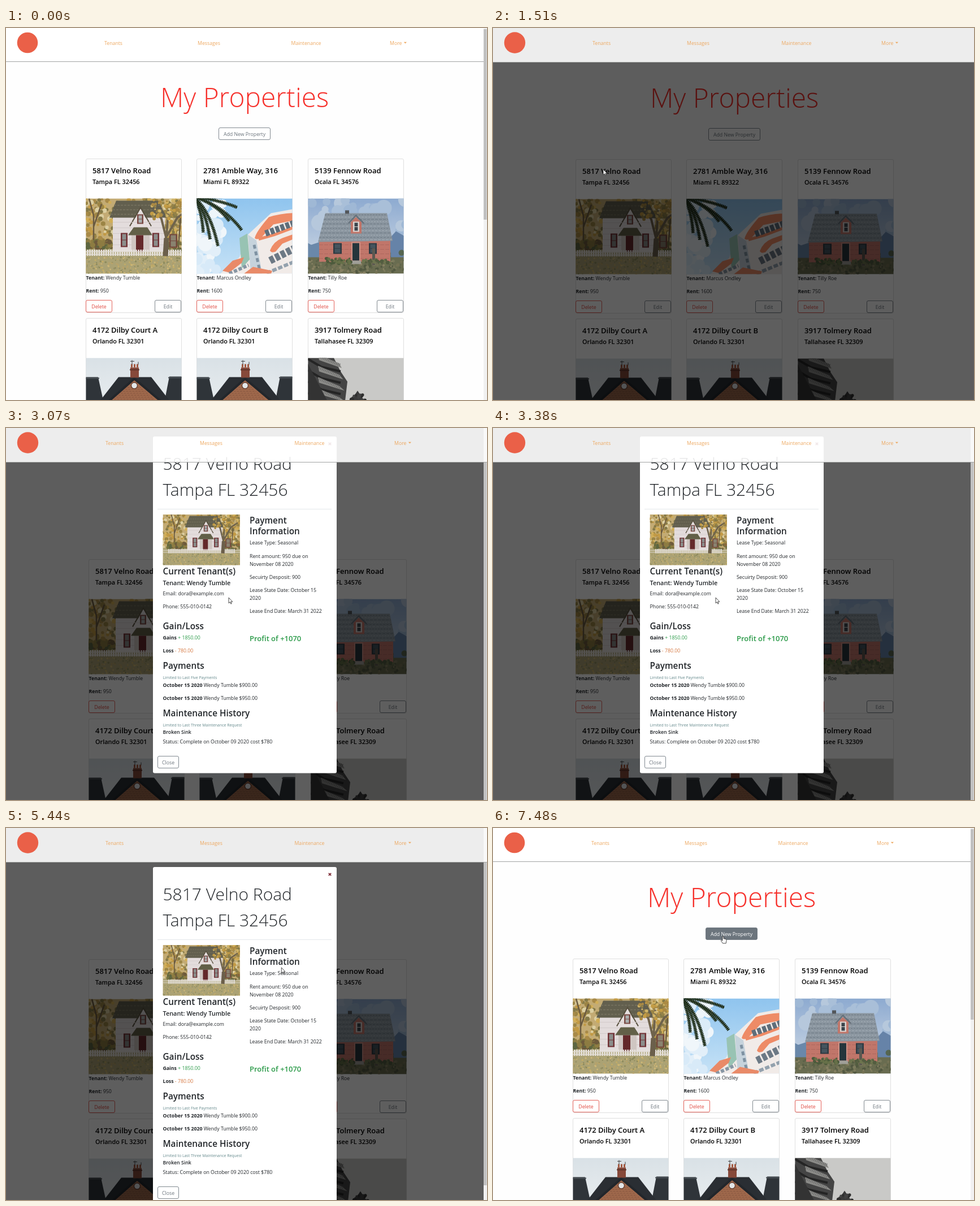
These frames come from a looping animation (851x658 px, 8 s). An HTML page:

```html
<!DOCTYPE html>
<html lang="en">
<head>
<meta charset="utf-8">
<title>My Properties</title>
<style>
html, body { margin: 0; width: 100%; height: 100%; overflow: hidden; background: #fefefe; }
svg { display: block; }
text { font-family: "Open Sans", "Noto Sans", sans-serif; fill: #212529; white-space: pre; }
.light { font-weight: 300; }
.semi { font-weight: 600; }
.bold { font-weight: 700; }
.mid { text-anchor: middle; }
#navItems text, #navItems path { fill: #eda860; }
#click { mix-blend-mode: multiply; }
</style>
</head>
<body>
<svg id="stage" width="851" height="658" viewBox="0 0 851 658"></svg>
<script>
const LOOP = 8000, BODY = 8.75, GREY = '#6c757d', RED = '#e0483f', ORANGE = '#f0a848';

// Drawing helpers
let seed = 7;
const rnd = () => (seed = seed * 16807 % 2147483647) / 2147483647;
const rect = (x, y, w, h, fill, more = '') =>
  `<rect x="${x}" y="${y}" width="${w}" height="${h}" fill="${fill}" ${more}/>`;
const shape = (fill, d) => `<path fill="${fill}" d="M${d}z"/>`;
const line = (d, stroke, width, dash = '') =>
  `<path d="M${d}" fill="none" stroke="${stroke}" stroke-width="${width}" stroke-dasharray="${dash}"/>`;
const dot = (x, y, r, fill) => `<circle cx="${x}" cy="${y}" r="${r}" fill="${fill}"/>`;
const text = (x, y, s, size = BODY, cls = '', fill = '') =>
  `<text x="${x}" y="${y}" font-size="${size}" class="${cls}" ${fill && `style="fill:${fill}"`}>${s}</text>`;
const bold = s => `<tspan class="bold">${s}</tspan>`;
const tint = (s, fill) => `<tspan style="fill:${fill}">${s}</tspan>`;
const gradient = (id, a, b) => `<linearGradient id="${id}" x2="0" y2="1">
  <stop stop-color="${a}"/><stop offset="1" stop-color="${b}"/></linearGradient>`;
const leaves = (n, x, y, w, h, r, colors) => Array.from({ length: n }, () =>
  dot((x + rnd() * w).toFixed(1), (y + rnd() * h).toFixed(1), (r * (.5 + rnd() * .7)).toFixed(1),
    colors[Math.floor(rnd() * colors.length)])).join('');
const pane = (x, y, w, h, frame, glass) =>
  rect(x, y, w, h, frame) + rect(x + 2.5, y + 2, w - 5, h - 4, glass) +
  line(`${x},${y + h / 2}h${w}`, frame, 1);
const button = (x, y, w, label, color) =>
  rect(x, y, w, 21, 'none', `rx="2.5" stroke="${color}" stroke-opacity=".85"`) +
  text(x + w / 2, y + 14.2, label, BODY, 'mid', color);

// Pictures, each 202 x 133
const pictures = {
  cottage: () => rect(0, 0, 202, 133, '#c3ab74') +
    leaves(420, 0, 0, 202, 88, 4, ['#c29a45', '#d1ae58', '#a88a48', '#857a48', '#dccfa2', '#9c8545']) +
    line('30,88V30L22,0M30,50L44,10M180,88L184,30', '#6a5a40', 2.5) +
    rect(0, 88, 202, 45, '#aba274') +
    leaves(60, 12, 74, 50, 16, 4, ['#5d6640', '#77743f', '#6d5a3c', '#8d7c42']) +
    leaves(30, 158, 78, 44, 14, 4, ['#6b6a40', '#8a6a3c', '#7d7546']) +
    rect(64, 32, 92, 62, '#e3dcdc') + shape('#625f4e', '70,4H144L160,34L58,34') +
    line('66,12H147M64,20H152M60,28H156', '#787460', 1.4, '4 2') +
    shape('#e6dfdf', '113,17L96,50V60H130V50') + line('94,49L113,16L132,49', '#58513f', 2) +
    line('64,42H156M64,52H156M64,62H156M64,72H156M64,82H156', '#d2caca', 1) +
    pane(107, 28, 11, 17, '#7a4a44', '#a9b0b0') +
    rect(97, 64, 32, 30, '#cfc6c2') + shape('#626048', '91,65L101,51H125L134,65') +
    rect(105, 65, 13, 30, '#64292b') + pane(78, 61, 12, 25, '#713135', '#8b8e8c') +
    pane(134, 61, 12, 25, '#713135', '#8b8e8c') + pane(164, 63, 14, 24, '#74483c', '#8a8370') +
    line('14,96H190', '#e9e4df', 11, '2.6 1.5') + line('0,94H202M0,99H202', '#e0dad3', 1.4) +
    line('157,102L159,70', '#6b5f4b', 9) +
    line('159,72L150,36L138,18M159,68L162,20M160,66L178,34L196,22', '#6f634c', 4) +
    leaves(70, 132, 2, 66, 34, 3, ['#c39c45', '#ab8a44', '#948248', '#d0b468']) +
    leaves(320, 0, 104, 202, 29, 1.5, ['#c4ad66', '#8d8a5c', '#cdb677', '#979165', '#b9a36a']),

  hotel: () => rect(0, 0, 202, 133, 'url(#blue)') +
    leaves(34, 8, 56, 52, 78, 11, ['#f0f6fa', '#e2eff9', '#d8eaf8']) +
    leaves(16, 16, 4, 50, 52, 10, ['#eef5fa', '#dcecf8']) +
    shape('#f1ebe8', '58,133L92,104L107,64L148,26L202,16V133') +
    shape('#c6d3dc', '107,64L122,74L132,133H112') +
    shape('#98c3b3', '92,70L106,62L110,108L96,124') +
    shape('#ee8b66', '119,70Q122,58 144,33Q172,24 202,26V36L152,46L130,70Q122,74 119,70') +
    line('126,72L154,64L202,46', '#ee8b66', 5) +
    line('138,62L190,43', '#5f6e7a', 11, '7 2.5') +
    shape('#ee8b66', '146,92Q152,76 168,70L202,58V66L168,80L156,94Q148,97 146,92') +
    line('146,110L194,86', '#6c7985', 13, '8 3') + line('140,132L194,110', '#93a1ad', 6, '8 3') +
    line('118,82L128,128', '#7f92a2', 5, '7 5') +
    shape('#e98a68', '62,128L80,110L100,104L96,114L74,131') +
    shape('#e98a68', '100,133L116,121L150,128L148,133') +
    line('74,133L108,118', '#8796a4', 6, '6 3') +
    ['96,56', '88,16', '54,84', '28,60', '74,40', '66,-4', '40,72'].map(end => {
      const [x, y] = end.split(',');
      return line(`10,-4Q${x * .6 + 8},${y * .25} ${end}`, '#1d2b1c', 6, '2 1') +
        line(`10,-4Q${x * .6 + 8},${y * .25} ${end}`, '#25351f', 2.5);
    }).join(''),

  cabin: () => rect(0, 0, 202, 133, 'url(#dusk)') +
    leaves(30, 0, 2, 202, 60, 12, ['#a9bfd8', '#b6c8dc', '#9fb8d5']) +
    shape('#6a88aa', '0,70L22,82L40,76V108H0') +
    shape('#6683a8', '148,84L172,58L186,66L202,56V108H148') +
    leaves(24, 0, 94, 202, 10, 5, ['#566650', '#64705a']) +
    rect(0, 104, 202, 29, '#696c50') +
    leaves(200, 0, 107, 202, 26, 2.5, ['#5d6248', '#7b7a5c', '#525841', '#747254', '#868062']) +
    rect(36, 73, 126, 39, '#c1766a') +
    line('36,82H162M36,90H162M36,98H162M36,106H162', '#ae685e', 1.2, '7 2') +
    shape('#8a959f', '47,26H156L166,75L34,77') +
    Array.from({ length: 12 }, (_, i) =>
      line(`${46 - i},${29 + i * 4}H${156 + i * .8}`, i % 2 ? '#a3adb5' : '#6e7a84', 1.2, `${3 + i % 3} 2`)).join('') +
    shape('#c1766a', '92,62V42L101,33L111,42V62') + pane(96, 41, 11, 18, '#dcd5d2', '#3a444c') +
    line('88,44L101,30L115,44', '#66717b', 2.5) + rect(82, 21, 7, 6, '#53565a') +
    rect(93, 77, 16, 34, '#cf9186') + rect(95, 79, 12, 31, '#25353c') +
    pane(61, 79, 15, 19, '#2e3a42', '#45545e') + pane(124, 79, 14, 19, '#2e3a42', '#45545e') +
    rect(92, 110, 18, 6, '#a09f98') + rect(130, 88, 5, 30, '#5c5850') +
    leaves(40, 48, 106, 44, 9, 2.8, ['#4d5a3c', '#667048']) +
    leaves(30, 112, 108, 50, 8, 2.8, ['#535d40', '#6d744e']),

  brick: () => rect(0, 0, 202, 133, 'url(#pale)') +
    shape('#2f3439', '0,34H38L47,75V133H0') + shape('#2f3439', '164,33H202V133H156V74') +
    line('0,36H40M162,35H202', '#4b5157', 2) +
    shape('#2a2e33', '42,75L74,34H132L164,75V133H42') +
    shape('#a0694c', '102,39L57,78V133H149V78') +
    Array.from({ length: 20 }, (_, i) => {
      const y = 45 + i * 3.5, half = Math.min(44, (y - 41) * 1.12);
      return line(`${102 - half},${y}h${half * 2}`, '#84543e', 1, '4 1.5');
    }).join('') +
    line('53,80L102,37L153,80', '#22262b', 4) +
    rect(95, 17, 15, 18, '#86493a') + rect(94, 20, 17, 2, '#5e3329') +
    line('97.5,11V17M102.5,11V17M107.5,11V17', '#a45a42', 3) +
    line('98,12V4M95,6H102M109,12V7', '#3a3a3c', .9) +
    dot(102, 49, 6, '#5b3629') + dot(102, 49, 4.8, '#e3e6e8'),

  flats: () => rect(0, 0, 202, 133, '#c9c9c7') +
    shape('#444', '0,0H62L74,24L86,42L82,76L66,133H0') +
    [0, 20, 40, 60].map(y =>
      shape('#8b8b88', `34,${y - 6}L72,${y + 10}L${76 + y / 8},${y + 18}L36,${y + 4}`) +
      line(`16,${y + 2}L40,${y + 16}L74,${y + 24}`, '#242424', 4) +
      line(`36,${y - 3}L74,${y + 13}`, '#666', 5, '1 2')).join('') +
    shape('#333', '16,10L50,75L44,133H0V0') +
    shape('#3a3a3a', '104,58L92,76L86,133H124L116,76') +
    leaves(70, 88, 64, 30, 50, 3.5, ['#2e2e2e', '#424242', '#262626'])
};
const photo = (name, x, y, w, h) =>
  `<svg x="${x}" y="${y}" width="${w}" height="${h}" viewBox="0 0 202 133"
    preserveAspectRatio="xMidYMid slice"><use href="#${name}"/></svg>`;

// Page content
const cards = [
  ['5817 Velno Road', 'Tampa FL 32456', 'cottage', 'Wendy Tumble', 950],
  ['2781 Amble Way, 316', 'Miami FL 89322', 'hotel', 'Marcus Ondley', 1600],
  ['5139 Fennow Road', 'Ocala FL 34576', 'cabin', 'Tilly Roe', 750],
  ['4172 Dilby Court A', 'Orlando FL 32301', 'brick', '', ''],
  ['4172 Dilby Court B', 'Orlando FL 32301', 'brick', '', ''],
  ['3917 Tolmery Road', 'Tallahasee FL 32309', 'flats', '', '']
];
const card = ([street, city, picture, tenant, rent], i) => `
  <g transform="translate(${141.5 + Math.round(i % 3 * 196.4)} ${231.5 + Math.floor(i / 3) * 282})">
  ${rect(0, 0, 169, 272, '#fff', 'rx="2.5" stroke="#dfdfdf"')}
  <g id="heading${i}">${text(11.5, 25.5, street, 13, 'semi', 'inherit')}
  ${text(11.5, 44, city, 10.9, 'semi', 'inherit')}</g>
  ${photo(picture, 0, 70, 169, 133)}
  ${text(0, 213.5, bold('Tenant:') + ' ' + tenant)}${text(0, 236.5, bold('Rent:') + ' ' + rent)}
  ${button(0, 250, 46, 'Delete', RED)}${button(122, 250, 46, 'Edit', GREY)}</g>`;

const heading = (x, y, s) => text(x, y, s, 15.3, 'semi');
const L = 277.5, R = 431, GREEN = '#2a9a48', NOTE = '#64898c';
const modal = rect(260, 0, 325, 595.5, '#fff', 'rx="3"') +
  line('570.8,10.8l4.4,4.4m0,-4.4l-4.4,4.4', '#80303a', 1.8) +
  text(L, 59, cards[0][0], 30, 'light') + text(L, 105, cards[0][1], 30, 'light') +
  line('268,128.5H576', '#e4e7ea', 1) + photo('cottage', L, 138, 136.5, 89.5) +
  heading(L, 244, 'Current Tenant(s)') + text(L, 263, 'Tenant: Wendy Tumble', 10.9, 'semi') +
  text(L, 280.5, 'Email: dora@example.com') + text(L, 303.5, 'Phone: 555-010-0142') +
  heading(L, 341, 'Gain/Loss') +
  text(L, 359, bold('Gains') + tint(' + 1850.00', GREEN)) +
  text(L, 382, bold('Loss') + tint(' - 780.00', '#d5763f')) +
  heading(L, 411, 'Payments') + text(L, 429, 'Limited to Last Five Payments', 6.95, '', NOTE) +
  text(L, 443, bold('October 15 2020') + ' Wendy Tumble $900.00') +
  text(L, 466, bold('October 15 2020') + ' Wendy Tumble $950.00') +
  heading(L, 495, 'Maintenance History') +
  text(L, 513, 'Limited to Last Three Maintenance Request', 6.95, '', NOTE) +
  text(L, 526, 'Broken Sink', BODY, 'semi') +
  text(L, 543, 'Status: Complete on October 09 2020 cost $780') +
  button(268.5, 565.5, 37, 'Close', GREY) +
  heading(R, 154, 'Payment') + heading(R, 173, 'Information') +
  ['191,Lease Type: Seasonal', '214.5,Rent amount: 950 due on', '228.5,November 08 2020',
    '251.5,Secuirty Desposit: 900', '274.5,Lease State Date: October 15', '288.5,2020',
    '312,Lease End Date: March 31 2022'].map(row => text(R, ...row.split(','))).join('') +
  text(R, 362, 'Profit of +1070', 13, 'semi', GREEN);

const navItems = [[174, 'Tenants'], [339, 'Messages'], [504.5, 'Maintenance'], [679, 'More']];

stage.innerHTML = `
<defs>${gradient('blue', '#8fc4ee', '#c6e2f6')}${gradient('dusk', '#8daad0', '#d6dfe8')}
${gradient('pale', '#d9e1e6', '#f2f4f5')}
${Object.entries(pictures).map(([name, draw]) => `<g id="${name}">${draw()}</g>`).join('')}</defs>
<g id="page">
  ${text(422.2, 140, 'My Properties', 47.9, 'light mid', '#f6302b')}
  <rect id="addBox" x="376.5" y="176.5" width="91" height="21" rx="2.5" stroke="${GREY}" stroke-opacity=".85"/>
  <text id="addLabel" x="422" y="190.8" font-size="${BODY}" class="mid">Add New Property</text>
  ${cards.map(card).join('')}
  <g id="tooltip">${rect(260, 243, 45, 17, '#000', 'rx="3"')}${shape('#000', '257,251.5L260.5,248V255')}
  ${text(282.5, 254.6, 'More Info', 7.9, 'mid', '#fff')}</g>
</g>
<rect id="backdrop" width="851" height="658"/>
<g id="dialog">${modal}</g>
<g id="dialogBar">${rect(845, 0, 6, 658, '#f1f1f1')}
  <rect id="dialogThumb" x="845" width="5.5" fill="#c1c1c1"/></g>
<rect id="navBack" width="851" fill="#fff" opacity=".89"/>
<rect id="navLine" width="851" height="1" fill="#a2a4a3"/>
<circle id="logo" cy="26" fill="#ea6048"/>
<g id="navItems">${navItems.map(([, s]) => `<g>${text(0, 29.7, s)}
  ${s === 'More' ? shape('#eda860', '24.8,24.8h5.2l-2.6,2.8') : ''}</g>`).join('')}</g>
<g id="pageBar">${rect(845, 0, 6, 658, '#f1f1f1')}${rect(845, 2, 5.5, 337, '#c1c1c1')}</g>
<circle id="click" cx="573" cy="81.5" r="9" fill="#f7ee3e"/>
<g id="cursor" fill="#fff" stroke="#222" stroke-width=".8" stroke-linejoin="round">
  <path id="arrow" d="M0,0V9.8L2.3,7.8L3.9,11.2L5.2,10.6L3.8,7.3H6.8z"/>
  <path id="hand" d="M-1,.9q1,-1.4 2,0V4.6l4,1q1.2,.5 1,2L5.2,13H-.5L-3.6,8.5q0,-1.6 1.4,-1L-1,8.4z"/>
</g>`;

// Timeline: rows of [ms, values...], linear between rows
const cursorPath = [[180, 0, 294], [260, 170, 268], [340, 350, 222], [410, 477, 196], [730, 477, 196],
  [900, 420, 222], [1100, 280, 246], [1350, 195, 250], [1750, 195, 250], [2050, 310, 282],
  [2350, 379, 291], [2510, 384, 292], [2590, 384, 292], [2900, 394, 300], [3680, 394, 300],
  [3760, 394, 302], [3930, 394, 302], [4250, 387, 364], [4960, 387, 364], [5210, 484, 247],
  [5440, 487, 247], [5800, 598, 175], [5950, 609, 140], [6210, 571, 98], [6300, 571, 98],
  [6610, 573, 81], [6870, 573, 81], [7150, 480, 150], [7400, 407, 191]];
const dialogTop = [[1750, 56], [2000, 106], [2200, 106], [2350, 80], [2510, 65], [2590, 65], [2950, 15],
  [3470, 15], [3610, 11], [4320, 11], [4400, 13], [4480, 17], [4570, 43], [4670, 69], [6870, 69], [7050, 19]];
const dialogFade = [[1750, 0], [1950, 1], [6860, 1], [7050, 0]];
const backdropFade = [[1509, 0], [1510, .63], [7050, .63], [7200, 0]];

function at(rows, t) {
  const i = rows.findIndex(row => row[0] > t);
  if (i < 0) return rows[rows.length - 1].slice(1);
  if (i === 0) return rows[0].slice(1);
  const a = rows[i - 1], b = rows[i], k = (t - a[0]) / (b[0] - a[0]);
  return a.slice(1).map((v, j) => v + (b[j + 1] - v) * k);
}
const el = id => document.getElementById(id);
const set = (id, name, value) => el(id).setAttribute(name, value);
const show = (id, on) => { el(id).style.display = on ? '' : 'none'; };
const within = (t, from, to) => t >= from && t < to;

function render(now) {
  const t = now % LOOP;
  const open = within(t, 1510, 7200), onTitle = within(t, 1300, 1510), onAdd = t >= 7380;
  const hand = onTitle || within(t, 6500, 6900) || onAdd;
  const [top] = at(dialogTop, t), [fade] = at(dialogFade, t);

  set('page', 'transform', open ? 'translate(5 1)' : '');
  el('heading0').querySelectorAll('text').forEach(n => { n.style.fill = onTitle ? ORANGE : '#000'; });
  show('tooltip', onTitle);
  set('addBox', 'fill', onAdd ? GREY : '#fff');
  el('addLabel').style.fill = onAdd ? '#fff' : GREY;

  set('backdrop', 'opacity', at(backdropFade, t)[0]);
  set('dialog', 'transform', `translate(0 ${top})`);
  set('dialog', 'opacity', fade);
  show('dialogBar', fade > 0);
  set('dialogThumb', 'height', Math.min(658, 622 + (80 - top) * .91));

  const navHeight = open ? 60 : 59;
  set('navBack', 'height', navHeight);
  set('navLine', 'y', navHeight);
  set('logo', 'cx', open ? 38.5 : 38);
  set('logo', 'r', open ? 18.7 : 18.3);
  navItems.forEach(([x], i) =>
    el('navItems').children[i].setAttribute('transform', `translate(${x * (open ? 1.0118 : 1)} 0)`));
  show('pageBar', !open);

  show('click', within(t, 6790, 6870));
  show('cursor', t >= 180);
  set('cursor', 'transform', `translate(${at(cursorPath, t).join(' ')})`);
  show('hand', hand);
  show('arrow', !hand);
  requestAnimationFrame(() => render(performance.now()));
}
render(0);
</script>
</body>
</html>
```
